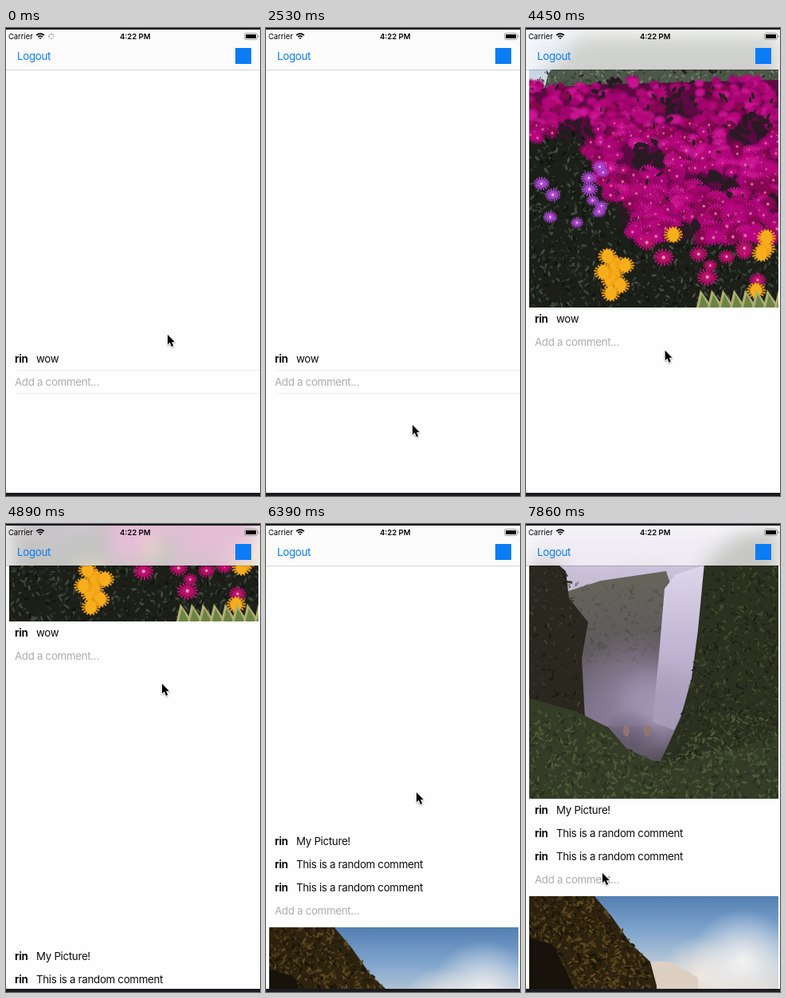
Write an HTML page with a canvas that moves like this. It is 319x586 px and loops after 8 s.

```html
<!DOCTYPE html>
<html lang="en">
<head>
<meta charset="utf-8">
<title>Photo feed</title>
<style>
  html, body { margin: 0; width: 100%; height: 100%; overflow: hidden; background: #fefefe; }
  canvas { display: block; width: 319px; height: 586px; }
</style>
</head>
<body>
<canvas id="stage"></canvas>
<script>
const W = 319, H = 586, LOOP = 8000, STEPS = 54;
const PX = 4, PW = 313, PH = 341, ROW = 29;
const FONT = 'Inter, "Liberation Sans", sans-serif';
const USER = 'rin', INK = '#0c0c0c', BLUE = '#0a7cf5', BAR = '#1c1b20';
const dpr = window.devicePixelRatio || 1;
const canvas = document.getElementById('stage');
const ctx = canvas.getContext('2d');
canvas.width = W * dpr;
canvas.height = H * dpr;

// Eased moves: from step, to step, then the value reached
const POINTER = [
  [0, 6, 184, 486], [9, 17, 184, 497], [17, 21, 165, 494], [27, 28, 168, 468],
  [28.6, 33, 196, 200], [33.5, 37, 169, 504], [38.5, 43, 189, 336], [45, 51, 96, 437]
];
const SCROLL = [[28.73, 33.5, 287], [38.5, 45, 461]];

function ease(a, b, k) {
  const f = Math.max(0, Math.min(1, (k - a) / (b - a)));
  return f * f * (3 - 2 * f);
}

function follow(moves, from, k) {
  return moves.reduce((pos, [a, b, ...to]) => {
    const f = ease(a, b, k);
    return pos.map((v, i) => v + (to[i] - v) * f);
  }, from);
}

function seeded(s) {
  return () => {
    s = (s * 1664525 + 1013904223) >>> 0;
    return s / 4294967296;
  };
}

function poly(g, color, ...pts) {
  g.fillStyle = color;
  g.beginPath();
  for (let i = 0; i < pts.length; i += 2) g.lineTo(pts[i], pts[i + 1]);
  g.fill();
}

function oval(g, color, x, y, rx, ry = rx, turn = 0) {
  g.fillStyle = color;
  g.beginPath();
  g.ellipse(x, y, rx, ry, turn, 0, Math.PI * 2);
  g.fill();
}

function glow(g, rgb, x, y, r) {
  const c = g.createRadialGradient(x, y, 0, x, y, r);
  c.addColorStop(0, `rgba(${rgb},.9)`);
  c.addColorStop(1, `rgba(${rgb},0)`);
  g.fillStyle = c;
  g.fillRect(x - r, y - r, r * 2, r * 2);
}

function fade(g, y0, y1, ...colors) {
  const c = g.createLinearGradient(0, y0, 0, y1);
  colors.forEach((v, i) => c.addColorStop(i / (colors.length - 1), v));
  return c;
}

// Small leaf strokes wherever inside(x, y) holds
function leaves(g, rnd, n, size, colors, inside) {
  for (let i = 0; i < n; i++) {
    const x = rnd() * PW, y = rnd() * PH, s = size * (0.5 + rnd());
    const c = colors[rnd() * colors.length | 0], turn = rnd() * 3;
    if (inside(x, y)) oval(g, c, x, y, s, s * 0.4, turn);
  }
}

function burst(g, x, y, r, color, core = color) {
  g.strokeStyle = color;
  g.lineWidth = r / 6;
  g.beginPath();
  for (let i = 0; i < 16; i++) {
    const a = i * Math.PI / 8 + x;
    g.moveTo(x, y);
    g.lineTo(x + Math.cos(a) * r, y + Math.sin(a) * r * 0.85);
  }
  g.stroke();
  oval(g, color, x, y, r * 0.5);
  oval(g, core, x, y, r * 0.17);
}

function photo(draw, seed) {
  const c = document.createElement('canvas');
  c.width = PW * dpr;
  c.height = PH * dpr;
  const g = c.getContext('2d');
  g.scale(dpr, dpr);
  draw(g, seeded(seed));
  return c;
}

function flowers(g, rnd) {
  const pick = list => list[rnd() * list.length | 0];
  const floor = x => Math.min(255, 130 + Math.max(0, x - 60) * 1.7);
  g.fillStyle = '#1b1f18';
  g.fillRect(0, 0, PW, PH);
  poly(g, fade(g, 0, 70, '#a9c6e6', '#d5dde6'), 0, 0, 130, 0, 60, 72, 0, 72);
  poly(g, '#4c5848', 64, 0, 24, 48, 18, 72, PW, 72, PW, 0);
  leaves(g, rnd, 4500, 1.9, ['#343f32', '#65715f', '#7d8776', '#3f4b3b'],
    (x, y) => y < 72 && x > 66 - y);
  leaves(g, rnd, 2500, 2.6, ['#28322a', '#38443a', '#444f42', '#11140f'],
    (x, y) => y > floor(x) - 30);
  poly(g, '#5c0a42', 0, 68, 80, 62, PW, 56, PW, 230, 150, 200, 60, 120, 0, 115);

  const pinks = ['#b8067f', '#a30570', '#cb1592', '#b00a76', '#860850'];
  for (let i = 0; i < 1000; i++) {
    const x = rnd() * PW, y = 58 + i / 5 + 5 * Math.sin(x / 24);
    const r = 4 + y / 36 + rnd() * 2, color = pick(pinks);
    const gap = Math.sin(x / 17 + y / 29) + Math.sin(y / 13 - x / 37) + rnd();
    if (y > floor(x)) continue;
    if (gap > 1.2) leaves(g, () => rnd(), 1, 3, ['#26211f'], () => true);
    if (gap > 1.5) oval(g, '#2a1a24', x, y, r * 0.7, r * 0.4, rnd() * 3);
    else burst(g, x, y, r, color, y > 110 ? '#dc6f9f' : color);
  }
  for (let i = 0; i < 11; i++)
    burst(g, 8 + rnd() * 88, 165 + i * 7, 7 + rnd() * 4, '#a944cf', '#e6c6ea');
  for (let i = 0; i < 9; i++)
    burst(g, 140 + rnd() * 165, 250 + rnd() * 62, 8 + rnd() * 5, '#bb0f6c', '#ee9ab4');

  // Yellow clumps: x, y, count
  for (const [x, y, n] of [[107, 300, 8], [297, 267, 3], [181, 250, 1], [285, 320, 1]]) {
    for (let i = 0; i < n; i++) {
      const a = i * 2.4, d = 7 * Math.sqrt(i);
      const cx = x + Math.cos(a) * d, cy = y + Math.sin(a) * d * 1.4;
      burst(g, cx, cy, 12, '#f09c12');
      oval(g, '#f7ae1c', cx, cy, 7, 9);
    }
  }
  for (let x = 210; x < PW; x += 14) {
    poly(g, '#b0b070', x, PH, x + 5, 319, x + 20, PH);
    poly(g, '#6b8446', x + 3, PH, x + 7, 325, x + 16, PH);
  }
}

function gorge(g, rnd) {
  g.fillStyle = fade(g, 0, PH, '#d6cfe9', '#c2b9d0', '#8f8499', '#625a6a', '#3f3d3a');
  g.fillRect(0, 0, PW, PH);
  poly(g, fade(g, 60, 250, '#66645a', '#5f5a5e', '#7d728a'),
    40, 84, 90, 68, 172, 56, 180, 80, 168, 250, 40, 250);
  leaves(g, rnd, 1600, 3, ['rgba(70,76,54,.35)', 'rgba(98,95,88,.3)', 'rgba(58,55,50,.3)'],
    (x, y) => x > 45 && x < 170 && y > 72 && y < 170);
  glow(g, '152,139,170', 135, 215, 85);
  poly(g, fade(g, 50, 260, '#ddd6ea', '#bfb4d2', '#a094b3'),
    170, 78, 184, 60, 222, 48, 212, 130, 206, 200, 182, 255, 155, 245, 164, 150);
  glow(g, '168,156,186', 165, 225, 60);
  glow(g, '96,88,110', 125, 275, 45);
  poly(g, '#2b3020', 220, 46, 260, 12, PW, 0, PW, PH, 160, PH, 166, 292, 190, 240, 204, 190, 212, 130);
  leaves(g, rnd, 3500, 2.4, ['#353f25', '#23271a', '#414b2b', '#1e2017'],
    (x, y) => x > 222 - Math.max(0, y - 110) * 0.24 && y > 225 - x * 0.72);
  poly(g, '#2a271f', 0, 46, 32, 44, 46, 56, 50, 90, 74, 120, 66, 165, 70, 240, 0, 260);
  leaves(g, rnd, 1500, 2.4, ['#1d1b15', '#37352a', '#3f3f2d', '#302d22'],
    (x, y) => x < 48 + y / 12 && y > 50);
  poly(g, '#343c27', 0, 215, 60, 232, 100, 252, 122, 278, 165, 298, 250, 280, PW, 262, PW, PH, 0, PH);
  leaves(g, rnd, 4500, 2.8, ['#434f30', '#283020', '#4d5a37', '#353f28'],
    (x, y) => y > 232 + Math.max(0, 64 - Math.abs(x - 155) * 0.6));
  for (const x of [122, 148]) {
    poly(g, '#7a655c', x, 255, x + 1, 255, x + 6, 300);
    oval(g, '#93766f', x, 256, 4, 7);
  }
}

function sunset(g, rnd) {
  g.fillStyle = fade(g, 0, 130, '#5380b2', '#7fa4cd', '#bccbda', '#e3d6c6');
  g.fillRect(0, 0, PW, PH);
  glow(g, '240,232,222', 215, 100, 50);
  glow(g, '250,246,242', 268, 82, 66);
  poly(g, '#ddd0c2', 148, 82, 178, 82, 212, 102, 214, PH, 150, PH);
  poly(g, '#2e230e', 0, 0, 82, 0, 104, 26, 128, 60, 152, 82, 160, 112, 170, PH, 0, PH);
  leaves(g, rnd, 6000, 2.6, ['#1a140a', '#453515', '#54421c', '#241c0e', '#5e4a22'],
    (x, y) => x < 80 + Math.min(72, y * 0.85));
  poly(g, '#17120a', 0, 52, 28, 60, 46, 92, 62, 130, 0, 130);
}

const posts = [
  { top: 59, shown: 18, img: photo(flowers, 11), notes: ['wow'] },
  { top: 464, shown: 48, img: photo(gorge, 23),
    notes: ['My Picture!', 'This is a random comment', 'This is a random comment'] },
  { top: 927, shown: 39, img: photo(sunset, 37), notes: [] }
];

function text(str, x, y, color, size = 13.3, weight = 400, gap = -0.3) {
  ctx.font = `${weight} ${size}px ${FONT}`;
  ctx.letterSpacing = gap + 'px';
  ctx.fillStyle = color;
  ctx.fillText(str, x, y);
}

function box(color, x, y, w, h) {
  ctx.fillStyle = color;
  ctx.fillRect(x, y, w, h);
}

function drawPhotos(k, scroll, bottom) {
  for (const p of posts) {
    const y = p.top - scroll;
    if (k >= p.shown && y < bottom && y + PH > 0) ctx.drawImage(p.img, PX, y, PW, PH);
  }
}

function feed(k, scroll) {
  drawPhotos(k, scroll, H);
  for (const p of posts) {
    if (!p.notes.length) continue;
    let base = p.top - scroll + PH + 19;
    for (const note of p.notes) {
      text(USER, 11, base, INK, 13.3, 700);
      text(note, 38, base, INK);
      base += ROW;
    }
    text('Add a comment...', 11, base, '#adadb0');
  }
  if (k < 28) for (const y of [428, 428 + ROW]) box('#ececee', 14, y, W, 1);
}

function navBar(k, scroll) {
  ctx.save();
  ctx.beginPath();
  ctx.rect(0, 0, W, 52);
  ctx.clip();
  box('#fff', 0, 0, W, 52);
  ctx.filter = `blur(${12 * dpr}px)`;
  drawPhotos(k, scroll, 52);
  ctx.restore();
  box('rgba(250,250,250,.75)', 0, 0, W, 52);
  box('rgba(0,0,0,.16)', 0, 52, W, 1);
  text('Logout', 14, 40, BLUE);
  box(BLUE, 288, 25, 20, 20);
}

function statusBar(k) {
  text('Carrier', 3, 14, '#000', 9.4, 400, 0);
  text('4:22 PM', 143, 14, '#000', 9.5, 600, 0);
  ctx.strokeStyle = '#000';
  ctx.lineWidth = 1.7;
  for (let r = 1; r < 7; r += 2.9) {
    ctx.beginPath();
    ctx.arc(43, 14, r, -Math.PI * 0.75, -Math.PI * 0.25);
    ctx.stroke();
  }
  if (k < 3) spinner(57, 10.5, k);
  ctx.strokeStyle = '#8c8c8c';
  ctx.lineWidth = 0.8;
  ctx.beginPath();
  ctx.roundRect(299.5, 6.5, 16, 8, 2);
  ctx.stroke();
  box('#000', 301, 8, 13, 5);
  box('#8c8c8c', 316.5, 9, 1, 3);
}

function spinner(x, y, k) {
  ctx.lineWidth = 1;
  for (let i = 0; i < 8; i++) {
    const a = i * Math.PI / 4, c = Math.cos(a), s = Math.sin(a);
    ctx.strokeStyle = `rgba(60,60,60,${0.35 + (i + k * 2) % 8 * 0.07})`;
    ctx.beginPath();
    ctx.moveTo(x + c * 2, y + s * 2);
    ctx.lineTo(x + c * 4, y + s * 4);
    ctx.stroke();
  }
}

const arrow = new Path2D('M0 0V14L3.2 11.2L5.6 17L8.2 15.9L5.8 10.4L10 10.2Z');

function pointer(x, y) {
  ctx.save();
  ctx.translate(x, y);
  ctx.scale(0.88, 0.88);
  ctx.lineJoin = 'round';
  ctx.lineWidth = 2;
  ctx.strokeStyle = '#fff';
  ctx.shadowColor = 'rgba(0,0,0,.35)';
  ctx.shadowBlur = 2 * dpr;
  ctx.shadowOffsetY = dpr;
  ctx.stroke(arrow);
  ctx.shadowColor = 'transparent';
  ctx.fillStyle = '#000';
  ctx.fill(arrow);
  ctx.restore();
}

function render(k) {
  const [scroll] = follow(SCROLL, [0], k);
  ctx.setTransform(dpr, 0, 0, dpr, 0, 0);
  box('#fefefe', 0, 0, W, H);
  feed(k, scroll);
  navBar(k, scroll);
  statusBar(k);
  box(BAR, 0, 0, W, 2);
  box(BAR, 0, 582, W, 4);
  pointer(...follow(POINTER, [203, 384], k));
}

const start = performance.now();
let last = -1;
function tick() {
  const k = Math.floor((performance.now() - start) % LOOP * STEPS / LOOP);
  if (k !== last) render(last = k);
  requestAnimationFrame(tick);
}
tick();
</script>
</body>
</html>
```
